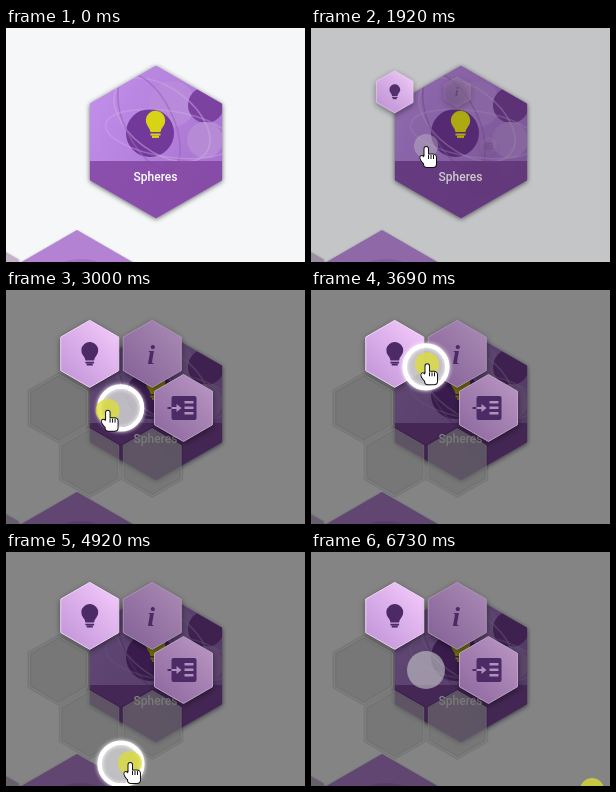
An HTML page with a canvas that plays this animation: 299x234 px, repeating every 6.8 s.

```html
<!DOCTYPE html>
<html lang="en">
<head>
<meta charset="utf-8">
<title>Radial menu</title>
<style>
  html, body { margin: 0; width: 100%; height: 100%; overflow: hidden; background: #f6f7f9; }
  canvas { display: block; }
</style>
</head>
<body>
<canvas id="stage" width="299" height="234"></canvas>
<script>
const ctx = document.getElementById('stage').getContext('2d');
const W = 299, H = 234, LOOP = 6800, TICKS = 88, STEP = LOOP / TICKS;
const HOME = { x: 115, y: 118 };
const INK = '#4c2a66';
const OPEN = 1540, OPEN_TIME = 620, STAGGER = 110;
const DRAG = 3013, PULL = 3554, RELEASE = 5940, LEAVE = 6027;

const clamp = v => Math.max(0, Math.min(1, v));
const ramp = (t, from, to) => clamp((t - from) / (to - from));
const mix = (a, b, k) => a + (b - a) * k;
const swing = k => (1 - Math.cos(Math.PI * k)) / 2;

// Turning points of the vertical pull: [time, y]
const turns = [[PULL, 88], [4095, 29], [4172, 29], [4950, 212], [5177, 112],
  [5332, 112], [5535, 212], [5795, 72], [RELEASE, HOME.y]];

function pullY(t) {
  const i = turns.findIndex(([end]) => t <= end);
  if (i < 0) return HOME.y;
  if (i === 0) return turns[0][1];
  const [t0, y0] = turns[i - 1], [t1, y1] = turns[i];
  return mix(y0, y1, swing(ramp(t, t0, t1)));
}

// One turn around the menu, then up and down
function knobAt(t) {
  if (t < DRAG) return HOME;
  if (t > PULL) return { x: HOME.x, y: pullY(t) };
  const p = ramp(t, DRAG, PULL);
  const reach = 58 * Math.min(1, 1.6 * Math.sin(Math.PI * p));
  const a = Math.PI * (1 - 1.5 * p);
  return { x: HOME.x + reach * Math.cos(a), y: mix(HOME.y, 88, p) + reach * Math.sin(a) };
}

function cursorAt(t) {
  if (t < 400) {
    const k = ramp(t, 155, 309);
    return { x: mix(216, 138, k), y: mix(193, 95, k) };
  }
  if (t < DRAG) {
    const k = ramp(t, 464, 695);
    return { x: mix(138, HOME.x, k), y: mix(95, HOME.y + 1, k) };
  }
  if (t < LEAVE) {
    const { x, y } = knobAt(t + 25);
    return { x: x + 16 * ramp(t, PULL, LEAVE), y: y + 1 };
  }
  if (t < 6700) return { x: mix(131, 320, ramp(t, LEAVE, 6258)), y: HOME.y + 1 };
  return { x: 281, y: 238 };
}

function hexPath(x, y, r) {
  ctx.beginPath();
  for (let i = 0; i < 6; i++) {
    const a = Math.PI * (i / 3 - 0.5);
    ctx.lineTo(x + r * Math.cos(a), y + r * Math.sin(a));
  }
  ctx.closePath();
}

function fill(color) {
  ctx.fillStyle = color;
  ctx.fill();
}

function stroke(color, width) {
  ctx.strokeStyle = color;
  ctx.lineWidth = width;
  ctx.stroke();
}

function disc(x, y, r, color) {
  ctx.beginPath();
  ctx.arc(x, y, r, 0, 7);
  fill(color);
}

function orbit(x, y, rx, ry, turn, color) {
  ctx.beginPath();
  ctx.ellipse(x, y, rx, ry, turn, 0, 7);
  stroke(color, 1.6);
}

function blend(x0, y0, x1, y1, from, to) {
  const g = ctx.createLinearGradient(x0, y0, x1, y1);
  g.addColorStop(0, from);
  g.addColorStop(1, to);
  return g;
}

function shadow(color, blur, dy = 0) {
  ctx.shadowColor = color;
  ctx.shadowBlur = blur;
  ctx.shadowOffsetY = dy;
}

function bulb(x, y, s, color) {
  ctx.save();
  ctx.translate(x, y);
  ctx.scale(s, s);
  ctx.beginPath();
  ctx.arc(0, -4, 9.7, Math.PI * 0.78, Math.PI * 2.22);
  ctx.quadraticCurveTo(5, 5, 5, 7.5);
  ctx.lineTo(-5, 7.5);
  ctx.quadraticCurveTo(-5, 5, -7.4, 2.2);
  fill(color);
  ctx.fillRect(-5, 9, 10, 2);
  ctx.fillRect(-3.5, 11, 7, 2.4);
  ctx.restore();
}

function infoIcon() {
  ctx.fillStyle = INK;
  ctx.font = 'italic bold 28px "Liberation Serif", serif';
  ctx.textAlign = 'center';
  ctx.fillText('i', -1, 10);
}

function enterIcon(paper) {
  ctx.beginPath();
  ctx.roundRect(-12, -12, 25, 24, 2);
  fill(INK);
  ctx.fillRect(-16, -1, 6, 2);
  ctx.fillStyle = paper;
  for (let i = -1; i <= 1; i++) ctx.fillRect(1, i * 5.5 - 1.5, 9, 2.5);
  ctx.fillRect(-12, -1, 6, 2);
  ctx.beginPath();
  ctx.moveTo(-7, -4);
  ctx.lineTo(-2, 0);
  ctx.lineTo(-7, 4);
  ctx.fill();
}

const looks = [
  { from: '#c598da', to: '#eec4f8', edge: '#f0d6f8', icon: () => bulb(0, 0, 0.87, INK) },
  { from: '#88659a', to: '#a585b0', edge: '#ad92b8', icon: infoIcon },
  { from: '#916ca2', to: '#b491be', edge: '#bda0c8', icon: () => enterIcon('#b290be') }
];

function menuItem(i, t) {
  const start = OPEN + i * STAGGER;
  const k = ramp(t, start, start + OPEN_TIME);
  if (!k) return;
  const a = Math.PI * (i - 2) / 3, look = looks[i];
  ctx.save();
  ctx.translate(HOME.x + 62.5 * Math.cos(a), HOME.y + 62.5 * Math.sin(a));
  ctx.scale(k, k);
  ctx.globalAlpha = Math.min(1, k * k * 2.4);
  hexPath(0, 0, 33.5);
  if (look) {
    ctx.save();
    shadow('rgba(0,0,0,.5)', 6, 2);
    fill(blend(-22, 24, 24, -20, look.from, look.to));
    ctx.restore();
    stroke(look.edge, 1);
    look.icon();
  } else {
    stroke('rgba(0,0,0,.1)', 4);
    fill('rgba(110,112,110,.62)');
    stroke('rgba(160,160,160,.3)', 1);
  }
  ctx.restore();
}

function tile(dim) {
  ctx.save();
  hexPath(150, 114, 76.3);
  ctx.save();
  shadow('rgba(0,0,0,.6)', 5, 1);
  fill('#bd8fe4');
  ctx.restore();
  ctx.clip();

  ctx.fillStyle = blend(82, 60, 217, 130, '#c190ea', '#a873cf');
  ctx.fillRect(80, 35, 140, 160);
  disc(166, 76, 23, '#b98adc');
  disc(200, 77, 18, '#7c429f');
  disc(199, 112, 18, '#b78ad6');
  disc(144, 105, 24, '#73399a');
  disc(172, 150, 19, '#a878c8');
  orbit(156, 92, 55, 32, 0.65, 'rgba(205,172,230,.5)');
  orbit(143, 94, 24, 52, -0.45, 'rgba(150,102,185,.6)');
  orbit(163, 106, 64, 23, 0.15, 'rgba(205,172,230,.4)');
  ctx.fillStyle = 'rgba(128,68,160,.82)';
  ctx.fillRect(80, 133, 140, 60);
  ctx.fillStyle = `rgba(0,0,0,${dim})`;
  ctx.fillRect(80, 35, 140, 160);
  ctx.restore();

  bulb(149.5, 96.5, 1, '#d8d415');
  ctx.fillStyle = '#fff';
  ctx.font = '500 12px Roboto, sans-serif';
  ctx.textAlign = 'center';
  ctx.fillText('Spheres', 149.5, 152.5);
}

function neighbours() {
  ctx.save();
  shadow('rgba(0,0,0,.4)', 3, 1);
  hexPath(-54, 270, 77);
  fill('#c3b2ca');
  hexPath(71, 279, 77);
  fill('#b482d2');
  ctx.restore();
  ctx.beginPath();
  ctx.ellipse(75, 237, 19, 6, 0, 0, 7);
  fill('#a473c4');
}

function knob({ x, y }, k, active) {
  if (!k) return;
  disc(x, y, 19 * k, `rgba(198,198,200,${0.62 * k + 0.3 * active})`);
  if (!active) return;
  ctx.save();
  ctx.globalAlpha = active;
  shadow('#fff', 4);
  ctx.beginPath();
  ctx.arc(x, y, 21.3, 0, 7);
  stroke('#fff', 4.6);
  ctx.restore();
}

function hand({ x, y }) {
  ctx.save();
  ctx.translate(x, y);
  ctx.beginPath();
  ctx.roundRect(-1.5, 0, 3.5, 14, 1.7);
  ctx.roundRect(-2, 7.5, 12, 12.5, 3);
  ctx.ellipse(-2.5, 13, 2, 4.5, -0.6, 0, 7);
  stroke('#111', 2);
  fill('#fff');
  ctx.beginPath();
  for (let dx = 2.5; dx < 8; dx += 2.5) {
    ctx.moveTo(dx, 8);
    ctx.lineTo(dx, 12);
  }
  stroke('#111', 1);
  ctx.restore();
}

function draw(t) {
  ctx.fillStyle = '#f6f7f9';
  ctx.fillRect(0, 0, W, H);
  neighbours();
  tile(0.07 * ramp(t, 773, 1082));

  const open = ramp(t, OPEN, OPEN + OPEN_TIME);
  ctx.fillStyle = `rgba(0,0,0,${0.467 * open ** 1.8})`;
  ctx.fillRect(0, 0, W, H);

  for (let i = 0; i < 6; i++) menuItem(i, t);
  const held = ramp(t, 2550, 2850);
  knob(knobAt(t), open, t < RELEASE ? held : 0);

  if (t < 150) return;
  const at = cursorAt(t);
  const click = 0.62 * ramp(t, 773, 927) * (1 - ramp(t, 1120, 1240));
  disc(at.x, at.y, 12, `rgba(222,222,50,${click + 0.75 * held})`);
  hand(at);
}

function tick(now) {
  draw(Math.floor((now % LOOP + 30) / STEP) % TICKS * STEP);
  requestAnimationFrame(tick);
}
requestAnimationFrame(tick);
</script>
</body>
</html>
```
